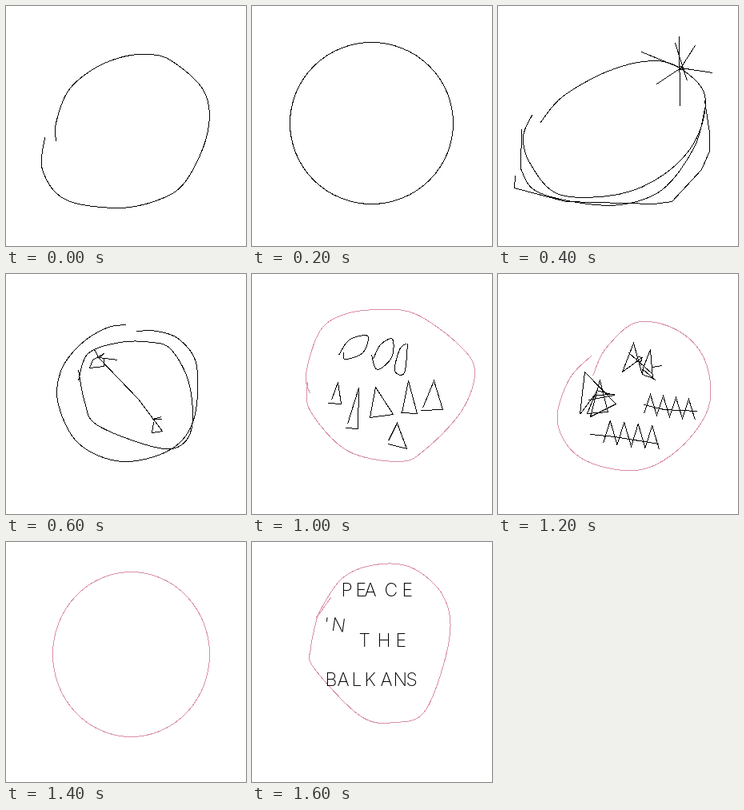
Recreate the animation shown at these times as an HTML page. Size 300 by 300 pixels, loop 1800 ms.

```html
<!DOCTYPE html>
<html lang="en">
<head>
<meta charset="utf-8">
<title>Hand-drawn circles</title>
<style>
  html, body { margin: 0; width: 100%; height: 100%; overflow: hidden; background: #fff; }
  svg { display: block; width: 100vw; height: 100vh; }
  path, ellipse { fill: none; stroke: #000; shape-rendering: crispEdges; }
  .pink { stroke: #d98ea4; }
  text { font: 200 23px Inter, sans-serif; }
  g { visibility: hidden; }
  g.on { visibility: visible; }
</style>
</head>
<body>
<svg viewBox="-.5 -.5 300 300"></svg>
<script>
  const svg = document.querySelector('svg');
  const sketches = [];

  function add(parent, tag, attrs) {
    const node = document.createElementNS('http://www.w3.org/2000/svg', tag);
    for (const name in attrs) node.setAttribute(name, attrs[name]);
    return parent.appendChild(node);
  }
  const put = (tag, attrs) => add(sketches.at(-1), tag, attrs);
  const sketch = () => sketches.push(add(svg, 'g'));
  const line = (d, color = '') => put('path', { d: 'M' + d, class: color });
  const oval = (cx, cy, rx, ry, turn = 0, color = '') =>
    put('ellipse', { cx, cy, rx, ry, transform: `rotate(${turn} ${cx} ${cy})`, class: color });

  // Smooth stroke passing through every given point
  function curve(points, color) {
    const p = points.split(' ').map(pair => pair.split(',').map(Number));
    const at = i => p[Math.max(0, Math.min(p.length - 1, i))];
    const handle = (i, sign) => at(i).map((v, k) => v + sign * (at(i + 1)[k] - at(i - 1)[k]) / 6);
    let d = `${p[0]}`;
    for (let i = 1; i < p.length; i++) d += `C${handle(i - 1, 1)} ${handle(i, -1)} ${p[i]}`;
    line(d, color);
  }

  // Pen going up and down while moving right
  function zigzag(x, width, top, bottom, count, slope) {
    const points = Array.from({ length: count }, (_, i) =>
      [x + width * i / (count - 1), (i % 2 ? top : bottom) + slope * i]);
    line(points.join(' '));
  }

  const word = (text, x, y, turn = 0) =>
    put('text', { x, y, rotate: turn }).textContent = text;

  // Open circle
  sketch();
  curve('62,168 62,146 77,106 106,80 142,64 178,60 208,69 248,108 251,160 223,220 187,243 136,252 73,241 45,204 48,164');

  sketch();
  oval(149, 146, 102, 101);

  // Bowl with a spark
  sketch();
  curve('52,146 80,113 137,81 192,68 228,78 258,111 247,166 207,210 150,235 76,235 40,197 31,163 42,136');
  line('29 154 28 203');
  curve('28,203 44,229 92,244 152,248 205,229 245,176 258,128');
  line('21 212 20 227 84 244 195 247 217 244 254 204 264 181 264 158 258 118');
  line('179 57 228 77 268 83M226 38 227 125M221 46 236 93M246 49 228 77 198 97');
  oval(228, 77, 2, 2);

  // Double ring with a barbell
  sketch();
  curve('150,63 125,67 92,88 68,121 65,163 91,212 145,234 205,219 234,182 238,115 217,82 188,71 162,71');
  curve('90,133 102,99 142,85 182,85 206,94 228,135 232,190 214,216 178,214 113,188 98,160 90,120');
  line('110 94 116 105 165 156 195 196');
  line('139 107 116 104 122 99 108 107 104 117 122 115 122 105');
  line('194 178 183 181 194 181M184 185 182 198 196 196');

  sketch();
  oval(150, 139, 89, 95, 0, 'pink');

  // Ovals and triangles
  sketch();
  curve('72,149 67,124 85,70 118,49 165,44 205,50 256,86 278,120 262,170 216,219 183,234 118,220 72,170 69,135', 'pink');
  curve('108,101 121,82 144,77 138,98 116,106 114,98');
  curve('149,101 156,119 174,104 175,81 160,88 151,106');
  curve('193,86 184,94 178,120 190,123 194,87');
  line('99 157 107 135 111 162 95 161M119 187 133 142 132 193 117 192');
  line('147 179 154 141 176 175ZM187 173 195 133 206 174 186 173');
  line('213 167 227 133 238 169 211 170M170 208 181 186 193 218 170 212');

  // Scribbles
  sketch();
  curve('118,127 134,93 173,60 224,70 258,107 263,165 226,218 172,245 104,230 74,186 88,132 116,102', 'pink');
  line('155 122 169 86 179 122 190 94 193 130 180 125 181 119 197 133M155 122 181 103M163 98 192 124M192 116 205 114');
  oval(176, 106, 3, 3);
  line('102 175 108 122 147 162 115 178 127 132 137 172 111 174 123 145 145 151 113 157M102 175 120 151 146 150');
  line('182 163 207 169 249 171');
  zigzag(182, 64, 149, 174, 9, 1);
  line('115 200 145 203 201 212');
  zigzag(131, 70, 182, 211, 9, 1);

  sketch();
  oval(156, 140, 98, 103, 0, 'pink');

  // Handwritten message
  sketch();
  curve('98,69 80,94 111,46 153,28 200,32 239,68 246,122 217,209 178,225 135,217 77,157 73,132 81,93', 'pink');
  word('PEACE', '111 129 140 165 187', 67);
  word("'N", '88 98', 110, 8);
  word('THE', '133 156 179', 130);
  word('BALKANS', '91 106 124 140 160 176 192', 179);

  const STEP = 200;
  function draw() {
    const current = Math.floor(performance.now() / STEP) % sketches.length;
    sketches.forEach((group, i) => group.classList.toggle('on', i === current));
    requestAnimationFrame(draw);
  }
  draw();
</script>
</body>
</html>
```
